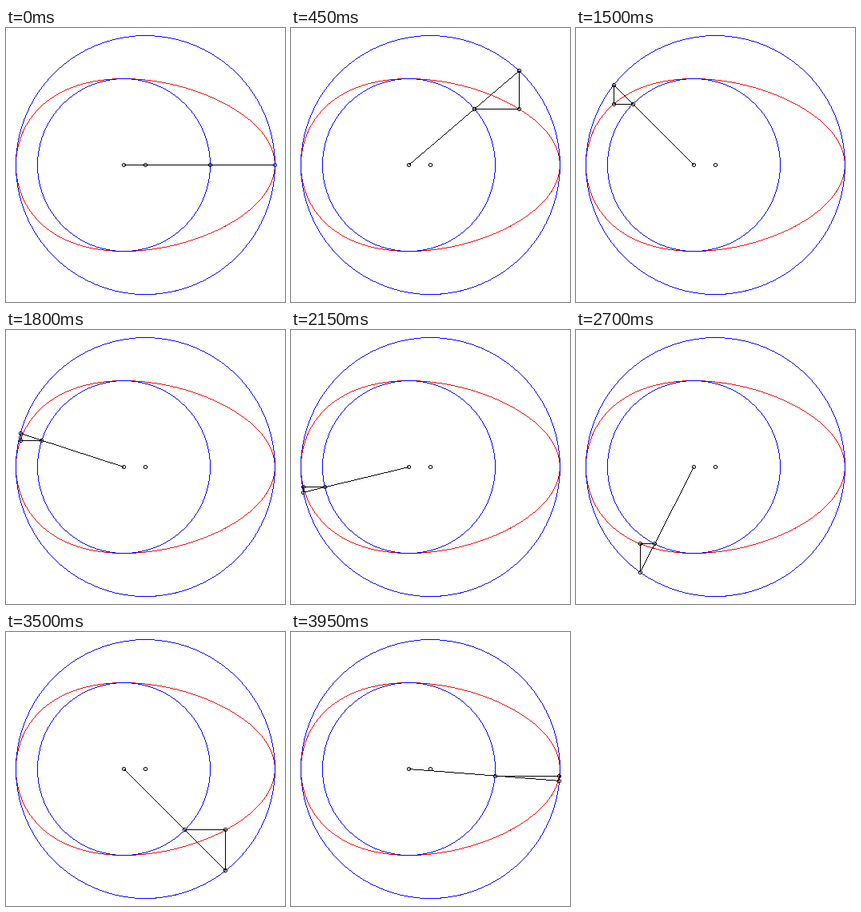
Write an HTML page with a canvas that moves like this. It is 349 px wide and 343 px high and loops after 4000 ms.

```html
<!DOCTYPE html>
<html lang="en">
<head>
<meta charset="utf-8">
<title>Egg curve construction</title>
<style>
html, body { margin: 0; width: 100%; height: 100%; overflow: hidden; background: #fff; }
canvas { display: block; width: 349px; height: 343px; image-rendering: pixelated; }
</style>
</head>
<body>
<canvas id="stage" width="349" height="343"></canvas>
<script>
const ctx = document.getElementById('stage').getContext('2d');
const TAU = 2 * Math.PI;
const STEPS = 80, STEP_MS = 50;
const CY = 171.03;
const inner = { x: 146.95, r: 108 };
const outer = { x: 173.95, r: 162 };
const gap = outer.x - inner.x;

const dot = (x, y) => ctx.fillRect(Math.round(x), Math.round(y), 1, 1);

// Hard-edged line: one pixel per step along the longer axis.
function line([x0, y0], [x1, y1]) {
  const steep = Math.abs(y1 - y0) > Math.abs(x1 - x0);
  let [a0, b0, a1, b1] = steep ? [y0, x0, y1, x1] : [x0, y0, x1, y1];
  if (a0 > a1) [a0, b0, a1, b1] = [a1, b1, a0, b0];
  const slope = a1 > a0 ? (b1 - b0) / (a1 - a0) : 0;
  for (let a = Math.round(a0); a <= Math.round(a1); a++) {
    const b = b0 + slope * (a - a0);
    steep ? dot(b, a) : dot(a, b);
  }
}

function curve(color, pointAt) {
  ctx.fillStyle = color;
  for (let i = 0; i < STEPS; i++) {
    line(pointAt(TAU * i / STEPS), pointAt(TAU * (i + 1) / STEPS));
  }
}

function marker(point, color = '#000') {
  const [x, y] = point.map(Math.round);
  ctx.fillStyle = color;
  for (let i = -1; i <= 1; i++) {
    dot(x + i, y - 2);
    dot(x + i, y + 2);
    dot(x - 2, y + i);
    dot(x + 2, y + i);
  }
}

const circle = c => t => [c.x + c.r * Math.cos(t), CY - c.r * Math.sin(t)];
const onInner = circle(inner);

// Where the ray from the inner centre meets the outer circle.
function onOuter(t) {
  const reach = gap * Math.cos(t) + Math.sqrt(outer.r ** 2 - (gap * Math.sin(t)) ** 2);
  return [inner.x + reach * Math.cos(t), CY - reach * Math.sin(t)];
}

const onEgg = t => [onOuter(t)[0], onInner(t)[1]];

function draw(step) {
  const t = TAU * step / STEPS;
  const near = onInner(t), far = onOuter(t), egg = onEgg(t);
  const centre = [inner.x, CY];

  ctx.fillStyle = '#fff';
  ctx.fillRect(0, 0, 349, 343);
  curve('#f00', onEgg);
  curve('#00f', onInner);
  curve('#00f', circle(outer));

  ctx.fillStyle = '#000';
  line(centre, far);
  line(near, egg);
  line(far, egg);

  [centre, [outer.x, CY], near, far].forEach(p => marker(p));
  marker(egg, step === 0 ? '#00f' : '#000');
}

let shown = -1;
const start = performance.now();
function tick() {
  const step = Math.floor((performance.now() - start) / STEP_MS) % STEPS;
  if (step !== shown) draw(shown = step);
  requestAnimationFrame(tick);
}
tick();
</script>
</body>
</html>
```
